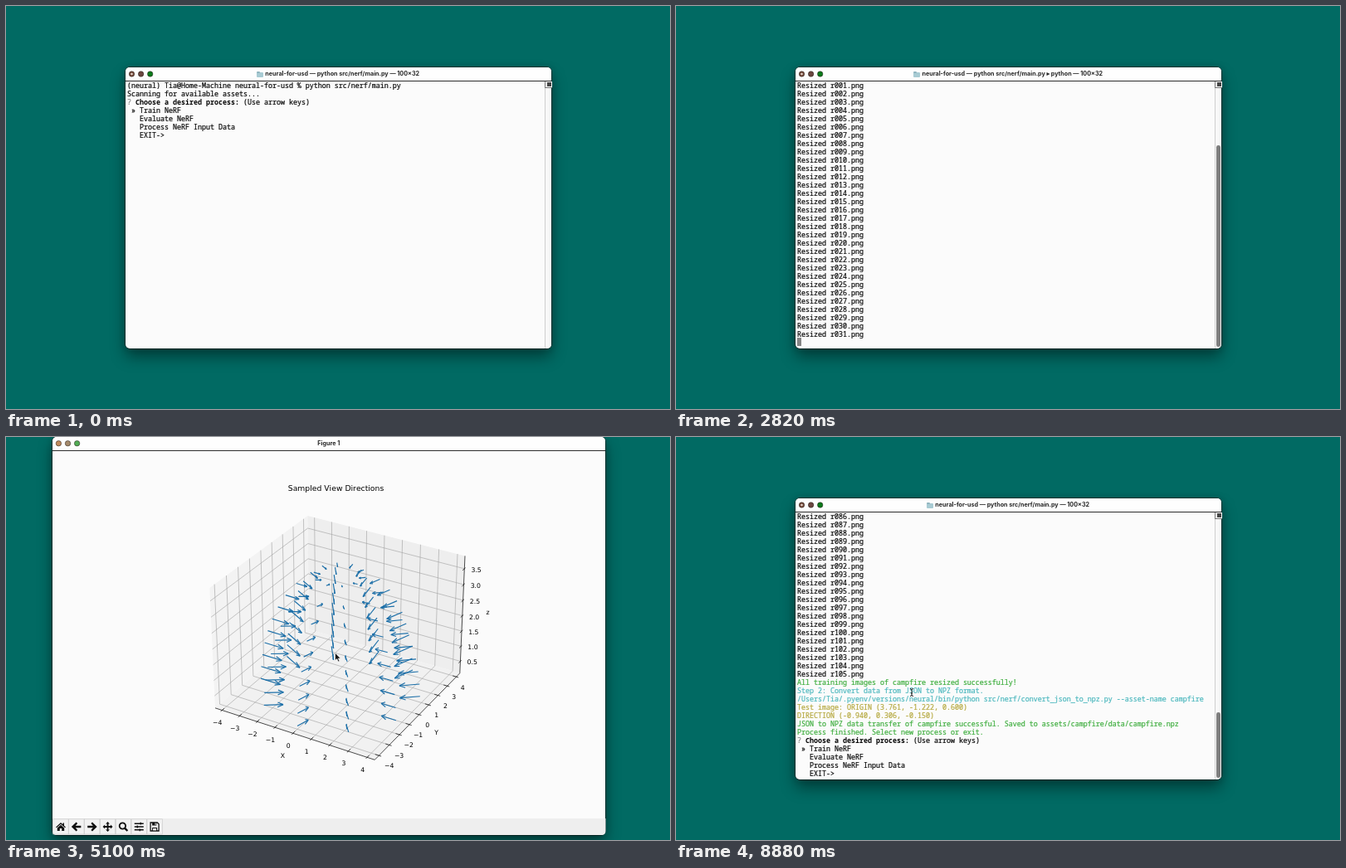
An HTML page with a canvas that plays this animation: 800x486 px, repeating every 8940 ms.

```html
<!DOCTYPE html>
<html lang="en">
<head>
<meta charset="utf-8">
<title>Terminal session</title>
<style>
html, body { margin: 0; width: 100%; height: 100%; overflow: hidden; background: #016a63; }
#stage { position: relative; width: 800px; height: 486px; overflow: hidden; }
.win { position: absolute; border-radius: 5px; background: #fbfbfb;
  box-shadow: 0 0 0 .7px rgba(0,0,0,.6), 0 10px 18px rgba(0,0,0,.42), 0 0 8px rgba(0,0,0,.2); }
.win.idle { box-shadow: 0 0 0 .7px rgba(0,0,0,.5), 0 4px 8px rgba(0,0,0,.35); }
.bar { position: absolute; left: 0; right: 0; top: 0; height: 17px; border-bottom: 1px solid #2c2c2c;
  border-radius: 5px 5px 0 0; background: #fefefe; box-sizing: border-box;
  display: flex; justify-content: center; align-items: center; gap: 2px;
  font: 700 7.2px/16px Inter, sans-serif; color: #262626; white-space: pre; }
.idle .bar { color: #707070; background: #f0f0f0; }
.folder { width: 8px; height: 6px; border-radius: 1px; background: #a8cbd3; position: relative; top: .5px; }
.folder::before { content: ""; position: absolute; left: 0; top: -1px; width: 4px; height: 2px; border-radius: 1px; background: #8fb4bf; }
.win > svg { position: absolute; left: 0; top: 0; overflow: visible; }
#term { left: 143.5px; top: 74px; width: 513.5px; height: 338.5px; }
#rows { position: absolute; left: 2.5px; top: 17px; font: 400 8.3333px/10px "Noto Sans Mono", "DejaVu Sans Mono", monospace;
  -webkit-text-stroke: .22px currentColor; color: #0c0c0c; white-space: pre; }
#rows div { height: 10px; }
#rows b { font-weight: 700; color: #000; -webkit-text-stroke: 0; }
.q { color: #8a8a8a; }
.a { color: #d9b03c; font-weight: 700; -webkit-text-stroke: 0; }
.y { color: var(--y); } .c { color: var(--c); } .g { color: var(--g); }
#block { position: absolute; left: 2.5px; width: 5px; height: 10px; background: #858585; box-sizing: border-box; }
.idle #block { background: none; border: 1px solid #858585; }
#track { position: absolute; right: 0; top: 17px; bottom: 0; width: 8px; border-left: 1px solid #cfcfcf; background: #f8f8f8; border-radius: 0 0 5px 0; box-sizing: border-box; }
#split { position: absolute; left: -1px; top: 0; width: 8px; height: 7px; border: solid #777; border-width: 0 0 1px 1px; background: #fff; }
#split::after { content: ""; position: absolute; left: 1.5px; top: 1px; width: 5px; height: 5px; background: #444; }
#thumb { position: absolute; right: 1.5px; bottom: 1.5px; width: 4.6px; border-radius: 2.3px; background: #7f7f7f; }
#photo { position: absolute; left: 80px; top: 47.5px; width: 205px; height: 205px; image-rendering: pixelated; }
#pos { position: absolute; right: 4px; bottom: 1px; text-align: right; font: 600 6.9px/8.6px Inter, sans-serif; color: #111; white-space: pre; }
#pointer { position: absolute; left: 0; top: 0; overflow: visible; }
.plot text { font-family: "DejaVu Sans", sans-serif; font-size: 7.72px; font-kerning: none; fill: #000; text-anchor: middle; }
.plot .head { font-size: 9.26px; }
.glyph { opacity: 0; fill: none; stroke: #151515; stroke-width: 1.1; }
.hover .glyph { opacity: 1; }
</style>
</head>
<body>
<div id="stage">
  <div class="win" id="term">
    <div class="bar"><i class="folder"></i><span id="title"></span></div>
    <div id="rows"></div><div id="block"></div>
    <div id="track"><div id="split"></div><div id="thumb"></div></div>
  </div>
  <svg id="pointer" width="1" height="1">
    <circle id="ring" r="11.7" fill="none" stroke="#1c1c1c" stroke-width="1"/>
    <path id="arrow" d="M0 0V9.2L2.2 7.2L3.8 10.6L5.3 10L3.8 6.7H6.6Z" fill="#161616" stroke="#fff" stroke-width=".6"/>
    <path id="beam" d="M-2-4.5Q0-4.5 0-3Q0-4.5 2-4.5M0-3V3M-2 4.5Q0 4.5 0 3Q0 4.5 2 4.5M-1 1H1" fill="none" stroke="#222" stroke-width="1"/>
  </svg>
</div>
<script>
const LOOP = 8940;
const $ = id => document.getElementById(id);
const clamp = v => Math.min(1, Math.max(0, v));
const ramp = (t, a, b) => clamp((t - a) / (b - a));
const smooth = u => u * u * (3 - 2 * u);
const span = (cls, text) => `<span class="${cls}">${text}</span>`;
const line = (a, b, w, color) =>
  `<path d="M${a.map(n => n.toFixed(2))}L${b.map(n => n.toFixed(2))}" stroke="${color}" stroke-width="${w}"/>`;
const label = (x, y, text, extra = '') => `<text x="${x}" y="${y}" ${extra}>${text}</text>`;
const minus = n => String(n).replace('-', '\u2212');

// Window parts
function lights(colors, y, x0, dot) {
  const glyphs = ['M-1.6-1.6L1.6 1.6M1.6-1.6L-1.6 1.6', 'M-2 0H2', 'M-1.6-1.6L1.6 1.6'];
  return colors.map((c, i) => `<g transform="translate(${x0 + i * 11.1} ${y})">
    <circle r="3.2" fill="${c}" stroke="#2b2420" stroke-opacity=".7" stroke-width=".8"/>
    <path class="glyph" d="${glyphs[i]}"/>${dot && !i ? '<circle r="1.2" fill="#e8dcd4"/>' : ''}</g>`).join('');
}

const ICONS = [
  '<path d="M-6 .5L0-5L2.5-2.7V-4.5H4V-1.3L6 .5L5 1.3L0-3.2L-5 1.3Z"/><path d="M-4.2 1.5L0-2.2L4.2 1.5V5H1.2V2H-1.2V5H-4.2Z"/>',
  '<path d="M-6 0L-.3-5.5L1.3-3.9L-1.1-1.2H5.5V1.2H-1.1L1.3 3.9L-.3 5.5Z"/>',
  '<path d="M6 0L.3-5.5L-1.3-3.9L1.1-1.2H-5.5V1.2H1.1L-1.3 3.9L.3 5.5Z"/>',
  '<path d="M0-6L2.4-3.4H.9V-.9H3.4V-2.4L6 0L3.4 2.4V.9H.9V3.4H2.4L0 6L-2.4 3.4H-.9V.9H-3.4V2.4L-6 0L-3.4-2.4V-.9H-.9V-3.4H-2.4Z"/>',
  '<circle cx="-1" cy="-1" r="3.7" fill="none" stroke="#101010" stroke-width="1.8"/><path d="M1.6 1.6L5 5" stroke="#101010" stroke-width="2.3"/>',
  '<path d="M-5.5-3.8H5.5M-5.5 0H5.5M-5.5 3.8H5.5M2-5.2V-2.4M-2-1.4V1.4M1 2.4V5.2" stroke="#101010" stroke-width="1.4"/>',
  '<path d="M-5-5H3.2L5-3.2V5H-5Z" fill="none" stroke="#101010" stroke-width="1.3"/><path d="M-3-5H2.2V-1.6H-3ZM-3 1H3V5H-3Z"/><path d="M.4-4.4H1.5V-2.3H.4ZM-2 2H2V4.4H-2Z" fill="#eee"/>'
];

function figure(id, x, y, w, h, colors, art) {
  const el = document.createElement('div');
  el.className = 'win';
  el.id = id;
  el.style.cssText = `left:${x}px;top:${y}px;width:${w}px;height:${h}px`;
  const ty = y + h - 20;
  const tools = ICONS.map((d, i) => {
    const cx = x + 10 + i * 18.85;
    return `<rect x="${cx - 9.2}" y="${ty + .8}" width="18.4" height="18.2" fill="#f2f2f2" stroke="#c9c9c9" stroke-width=".7"/>
      <g transform="translate(${cx} ${ty + 10})" fill="#101010">${d}</g>`;
  }).join('');
  el.innerHTML = `<div class="bar">Figure 1</div><svg class="plot" width="${w}" height="${h}" viewBox="${x} ${y} ${w} ${h}">
    ${lights(colors, y + 7.7, x + 7.4)}<path d="M${x} ${ty}h${w}v15q0 5-5 5h${10 - w}q-5 0-5-5z" fill="#eeeeee"/>${tools}${art}</svg>`;
  $('stage').insertBefore(el, $('pointer'));
  return el;
}

// 3D axes seen from elevation 30, azimuth -60
const LIM = 4.4, Z0 = .1, Z1 = 3.9;
function project([x, y, z]) {
  const a = x * .5715 / LIM, b = y * .5715 / LIM, c = ((z - Z0) / (Z1 - Z0) - .5) * .857;
  const k = 1928 / (10 - (.433 * a - .75 * b + .5 * c));
  return [401.5 + k * (.866 * a + .5 * b), 235.4 - k * (-.25 * a + .433 * b + .866 * c)];
}
const seg = (p, q, w, color) => line(project(p), project(q), w, color);
const pane = (pts, fill) => `<path d="M${pts.map(p => project(p).map(n => n.toFixed(2))).join('L')}Z" fill="${fill}"/>`;

// Arrows point inward and dip only slightly, so they shorten towards the top
function arrow3d(azim, s) {
  const r = Math.sqrt(1 - s * s), dip = .13 * r, ca = Math.cos(azim), sa = Math.sin(azim);
  const tail = [4 * r * ca, 4 * r * sa, 4 * s];
  const dir = [-r * ca, -r * sa, -dip];
  const tip = tail.map((v, i) => v + dir[i]);
  // barbs lie in the vertical plane through the shaft
  const up = [-dip * ca, -dip * sa, r];
  const barb = sign => tip.map((v, i) => v - .3 * (dir[i] * .966 + sign * up[i] * .259));
  return [tail, barb(1), barb(-1)].map(p => seg(p, tip, 1.16, '#1c6fa8')).join('');
}

function viewPlot() {
  const L = LIM, grid = '#a6a6a6';
  let s = pane([[-L, -L, Z0], [-L, L, Z0], [-L, L, Z1], [-L, -L, Z1]], '#f3f3f3')
    + pane([[-L, L, Z0], [L, L, Z0], [L, L, Z1], [-L, L, Z1]], '#eeeeee')
    + pane([[-L, -L, Z0], [L, -L, Z0], [L, L, Z0], [-L, L, Z0]], '#f1f1f1');
  for (let v = -4; v <= 4; v++) {
    s += seg([v, -L, Z0], [v, L, Z0], .65, grid) + seg([v, L, Z0], [v, L, Z1], .65, grid)
      + seg([-L, v, Z0], [L, v, Z0], .65, grid) + seg([-L, v, Z0], [-L, v, Z1], .65, grid);
  }
  for (let z = .5; z < 3.6; z += .5)
    s += seg([-L, -L, z], [-L, L, z], .65, grid) + seg([-L, L, z], [L, L, z], .65, grid);
  s += seg([-L, -L, Z0], [L, -L, Z0], .7, '#000') + seg([L, -L, Z0], [L, L, Z0], .7, '#000')
    + seg([L, L, Z0], [L, L, Z1], .7, '#000');
  for (let v = -4; v <= 4; v++) {
    const [ax, ay] = project([v, -L, Z0]), [bx, by] = project([L, v, Z0]);
    s += seg([v, -L - .12, Z0], [v, -L + .2, Z0], .7, '#000') + label(ax - 5.5, ay + 17.3, minus(v))
      + seg([L + .12, v, Z0], [L - .2, v, Z0], .7, '#000') + label(bx + 10 - v * .6, by + 15.3, minus(v));
  }
  for (let z = .5; z < 3.6; z += .5) {
    const [x, y] = project([L, L, z]);
    s += seg([L, L + .12, z], [L, L - .2, z], .7, '#000') + label(x + 14.3, y + 4, z.toFixed(1));
  }
  for (let k = 0; k < 10; k++)
    for (let i = 0; i < 10; i++) s += arrow3d((-18 + 36 * k) * Math.PI / 180, .05 + i * .1);
  return s + label(333, 387, 'X') + label(518, 359, 'Y') + label(580, 214, 'z')
    + label(397, 64.5, 'Sampled View Directions', 'class="head"');
}

function imagePlot() {
  let s = '<rect x="135.5" y="57.5" width="205" height="205" fill="none" stroke="#000" stroke-width=".8"/>';
  for (let v = 0; v < 100; v += 20) {
    const d = v * 2.05;
    s += line([136.5 + d, 262.5], [136.5 + d, 265.5], .7, '#000') + label(136.5 + d, 274, v)
      + line([132.5, 58.5 + d], [135.5, 58.5 + d], .7, '#000') + label(130, 61.3 + d, v, 'style="text-anchor:end"');
  }
  return s + label(237.5, 53, 'Test Image Preview', 'class="head"');
}

function paintPhoto(ctx) {
  const sky = ctx.createLinearGradient(0, 0, 0, 100);
  [[0, '#ebe9b8'], [.07, '#dccb9c'], [.13, '#c0a585'], [.18, '#dccfa4'], [.24, '#d9e3bc'], [.32, '#bdd7c8'],
    [.42, '#a3c1c2'], [.6, '#86a0b0'], [.8, '#6c87a0'], [1, '#5a7690']].forEach(([o, c]) => sky.addColorStop(o, c));
  ctx.fillStyle = sky;
  ctx.fillRect(0, 0, 100, 100);
  let seed = 7;
  const rand = () => (seed = seed * 16807 % 2147483647) / 2147483647;
  const box = (color, x, y, w, h) => { ctx.fillStyle = color; ctx.fillRect(x, y, w, h); };
  const rock = (x, y, rx, ry) => {
    ctx.save();
    ctx.beginPath();
    for (let i = 0; i < 14; i++) {
      const a = i * Math.PI / 7, k = .95 + rand() * .1;
      ctx.lineTo(x + rx * k * Math.cos(a), y + ry * k * Math.sin(a));
    }
    ctx.clip();
    const shade = ctx.createLinearGradient(0, y - ry, 0, y + ry);
    shade.addColorStop(0, '#4c3226');
    shade.addColorStop(.3, '#63412d');
    shade.addColorStop(1, '#43302a');
    box(shade, x - rx * 1.1, y - ry * 1.1, rx * 2.2, ry * 2.2);
    for (let i = 0; i < rx * ry; i++)
      box(rand() < .5 ? 'rgba(30,18,14,.25)' : 'rgba(125,78,48,.25)',
        Math.floor(x + (rand() * 2 - 1) * rx), Math.floor(y + (rand() * 2 - 1) * ry), 2, 1);
    ctx.restore();
  };
  rock(34, 40, 7, 6);
  rock(69, 44, 8, 5);
  rock(20, 42, 9, 6);
  rock(14, 47, 9.5, 9);
  rock(26, 50, 12, 10);
  box('#6c3c22', 38, 33, 21, 5);
  box('#95491f', 36, 37, 26, 10);
  box('#4e2d1f', 42, 39, 3, 3);
  box('#4e2d1f', 50, 39, 4, 3);
  box('#4e2d1f', 38, 37, 22, 1);
  rock(80, 52, 10.5, 10);
  rock(81, 43, 10.5, 10);
  ctx.strokeStyle = '#2a1c18';
  ctx.lineWidth = 3;
  ctx.beginPath();
  ctx.arc(79, 44, 8, -.4, 1.9);
  ctx.stroke();
  rock(53.5, 51.5, 15, 10.5);
  box('rgb(84,61,46)', 41, 55, 4, 3);
}

const term = $('term');
term.insertAdjacentHTML('beforeend', `<svg width="1" height="1">${lights(['#744a3b', '#6c4640', '#0b7a1a'], 8, 7.5, true)}</svg>`);
const views = figure('views', 55.5, 0, 666.5, 480, ['#c08a5c', '#a58a6c', '#52ad55'], viewPlot());
const test = figure('test', 55.5, 10, 355.5, 302, ['#9a4f20', '#8a4a2a', '#00564a'], imagePlot());
test.insertAdjacentHTML('beforeend', '<canvas id="photo" width="100" height="100"></canvas><div id="pos"></div>');
test.insertBefore($('photo'), test.querySelector('svg'));
const photo = $('photo').getContext('2d', { willReadFrequently: true });
paintPhoto(photo);

// Terminal contents
const CHOOSE = span('q', '?') + ' <b>Choose a desired process:</b> ';
const ASSET = span('q', '?') + ' <b>Select an asset to process:</b> ';
const HINT = '(Use arrow keys)';
const PY = '/Users/Tia/.pyenv/versions/neural/bin/python src/nerf/';
const menu = sel => [CHOOSE + HINT,
  ...['Train NeRF', 'Evaluate NeRF', 'Process NeRF Input Data', 'EXIT-&gt;'].map((s, i) => (i === sel ? ' » ' : '   ') + s)];

function session(t) {
  const out = ['(neural) Tia@Home-Machine neural-for-usd % python src/nerf/main.py', 'Scanning for available assets...'];
  if (t < 1140) return out.concat(menu(t < 240 ? 0 : t < 720 ? 1 : 2));
  out.push(CHOOSE + span('a', 'Process NeRF Input Data'));
  if (t < 1740) return out.concat(ASSET + HINT, ' » campfire');
  out.push(ASSET + span('a', 'campfire'));
  if (t < 2040) return out;
  out.push('', span('y', "Processing input data to fit NeRF model for '{asset_choice}'"),
    span('c', 'Step 1: Resize to 100px by 100px.'), span('c', PY + 'resize_data.py --asset-name campfire'));
  const last = Math.min(105, Math.floor(8.5 + (t - 2340) * .0485));
  for (let i = 0; i <= last; i++) out.push(`Resized r${String(i).padStart(3, '0')}.png`);
  if (t >= 4350) out.push(span('g', 'All training images of campfire resized successfully!'),
    span('c', 'Step 2: Convert data from JSON to NPZ format.'),
    span('c', PY + 'convert_json_to_npz.py --asset-name campfire'));
  if (t >= 7080) out.push(span('y', 'Test image: ORIGIN (3.761, -1.222, 0.600)'), span('y', 'DIRECTION (-0.940, 0.306, -0.150)'));
  if (t >= 8400) out.push(
    span('g', 'JSON to NPZ data transfer of campfire successful. Saved to assets/campfire/data/campfire.npz'),
    span('g', 'Process finished. Select new process or exit.'), ...menu(0));
  return out;
}

// start time, then green, cyan, yellow
const TONES = [[0, '#38a13c', '#42b3c0', '#b8aa38'], [4300, '#2f9455', '#35b59a', '#b8aa38'],
  [6600, '#2a8424', '#30b0a0', '#988020'], [8220, '#3fae3f', '#4cb8be', '#b5a83e']];

let shown = '';
function drawTerm(t) {
  const busy = t >= 1740 && t < 8400;
  const all = session(t);
  const total = all.length + (busy ? 1 : 0);
  const html = all.slice(Math.max(0, total - 32)).map(s => `<div>${s}</div>`).join('');
  if (html !== shown) $('rows').innerHTML = shown = html;
  const block = $('block').style;
  block.display = busy ? '' : 'none';
  block.top = 16.3 + 10 * (Math.min(total, 32) - 1) + 'px';
  const thumb = $('thumb').style;
  thumb.display = total > 32 ? '' : 'none';
  thumb.height = 311 * 32 / total + 'px';
  $('title').textContent = `neural-for-usd — python src/nerf/main.py ${busy ? '▸ python ' : ''}— 100×32`;
  const tone = TONES.filter(p => p[0] <= t).pop();
  ['g', 'c', 'y'].forEach((k, i) => term.style.setProperty('--' + k, tone[i + 1]));
}

const PATH = [[4740, 440, 290], [5580, 330, 215], [6060, 63, 10.5], [7080, 63, 10.5], [7500, 223.7, 173.1],
  [7740, 223.7, 173.1], [8060, 63, 17], [8220, 63, 17], [8820, 284, 308]];
function pointerAt(t) {
  const i = PATH.findIndex(p => p[0] > t);
  if (i < 0) return PATH[PATH.length - 1].slice(1);
  if (!i) return null;
  const [t0, x0, y0] = PATH[i - 1], [t1, x1, y1] = PATH[i];
  const u = smooth(ramp(t, t0, t1));
  return [x0 + (x1 - x0) * u, y0 + (y1 - y0) * u];
}

function showWin(el, t, open, close) {
  const u = smooth(ramp(t, open, open + 120));
  const a = u * (1 - ramp(t, close, close + 60));
  el.style.visibility = a > 0 ? 'visible' : 'hidden';
  el.style.opacity = a;
  el.style.transform = u < 1 ? `scale(${.95 + .05 * u})` : 'none';
  return a > 0;
}

function draw(t) {
  drawTerm(t);
  const first = showWin(views, t, 4500, 6780), second = showWin(test, t, 7140, 8180);
  term.classList.toggle('idle', first || second);
  const p = pointerAt(t);
  $('pointer').style.display = p ? '' : 'none';
  if (!p) return;
  const [x, y] = p;
  $('pointer').style.transform = `translate(${x}px,${y}px)`;
  const inTerm = !first && !second && x > 144 && x < 648 && y > 91 && y < 412;
  $('arrow').style.display = inTerm ? 'none' : '';
  $('beam').style.display = inTerm ? '' : 'none';
  $('ring').style.display = (t >= 6600 && t < 6780) || (t >= 8080 && t < 8220) ? '' : 'none';
  views.classList.toggle('hover', x < 92 && y < 16);
  test.classList.toggle('hover', x < 92 && y > 10 && y < 26);
  const px = (x - 135.5) / 2.05 - .5, py = (y - 57.5) / 2.05 - .5;
  let note = '';
  if (second && px > -.5 && px < 99.5 && py > -.5 && py < 99.5) {
    const rgb = photo.getImageData(Math.floor(px + .5), Math.floor(py + .5), 1, 1).data;
    note = `(x, y) = (${px.toFixed(1)}, ${py.toFixed(1)})\n[${[0, 1, 2].map(i => +(rgb[i] / 255).toPrecision(3)).join(', ')}]`;
  }
  $('pos').textContent = note;
}

const start = performance.now();
function tick() {
  draw((performance.now() - start) % LOOP);
  requestAnimationFrame(tick);
}
tick();
</script>
</body>
</html>
```
